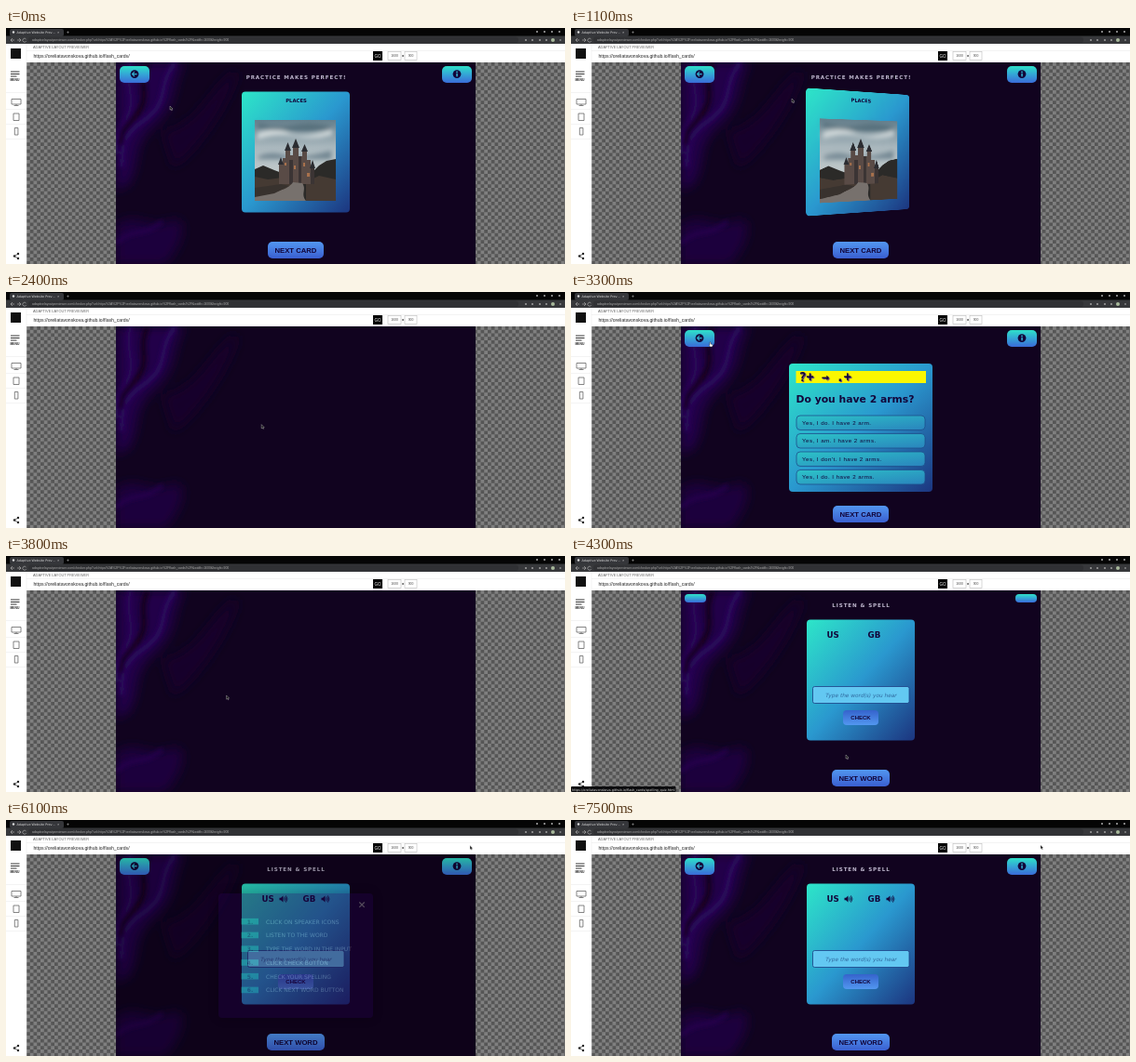
These frames come from a looping animation (600x254 px, 7.9 s). An HTML page:

```html
<!DOCTYPE html>
<html lang="en">
<head>
<meta charset="utf-8">
<title>Flash cards</title>
<style>
html, body { margin: 0; width: 100%; height: 100%; overflow: hidden; background: #fff; }
svg, #view, #app { position: absolute; left: 0; top: 0; width: 600px; height: 254px; }
#view { clip-path: inset(37px 96px 0 118px); background: #06010f; }
.face { transform-origin: 311px 133.5px; }
#checker {
  position: absolute; left: 22px; top: 37px; width: 578px; height: 217px;
  background: repeating-conic-gradient(#565656 0 25%, #7f7f7f 0 50%) 0 0 / 7.5px 7.5px;
}
text { white-space: pre; }
.sans { font-family: "Liberation Sans", Arial, sans-serif; }
.wide { font-family: "DejaVu Sans", Verdana, sans-serif; }
.mono { font-family: "DejaVu Sans Mono", monospace; }
.bold { font-weight: bold; }
.mid { text-anchor: middle; }
.shadow { text-shadow: 1px 1px 1px #4a2a90; }
</style>
</head>
<body>
<script>
const LOOP = 7900, STEP = 100;
const INK = '#12053a';
const SITE = 'https://oreliatavonskova.github.io/flash_cards/';

const rect = (x, y, w, h, fill, r = 0, extra = '') =>
  `<rect x="${x}" y="${y}" width="${w}" height="${h}" rx="${r}" fill="${fill}" ${extra}/>`;
const path = (d, fill, extra = '') => `<path d="${d}" fill="${fill}" ${extra}/>`;
const line = (d, color, width = 1, extra = '') =>
  path(d, 'none', `stroke="${color}" stroke-width="${width}" ${extra}`);
const circle = (x, y, r, fill) => `<circle cx="${x}" cy="${y}" r="${r}" fill="${fill}"/>`;
const text = (x, y, size, str, cls = 'sans', fill = INK, spacing = 0, extra = '') =>
  `<text x="${x}" y="${y}" font-size="${size}" class="${cls}" fill="${fill}" letter-spacing="${spacing}" ${extra}>${str}</text>`;
const layer = (id, body, cls = '') => `<svg id="${id}" class="${cls}" viewBox="0 0 600 254">${body}</svg>`;
const gradient = (id, x2, stops) =>
  `<linearGradient id="${id}" x1="0" y1="0" x2="${x2}" y2="1">` +
  stops.map((c, i) => `<stop offset="${i / (stops.length - 1)}" stop-color="${c}"/>`).join('') +
  '</linearGradient>';

const defs = '<defs>' +
  gradient('card', 1, ['#2de6c8', '#2a98cf', '#1c357f']) +
  gradient('nav', 0, ['#2ee0c8', '#34a5d6', '#3a6bd8']) +
  gradient('button', 0, ['#5297f0', '#3a5fd0']) +
  gradient('check', 0, ['#3563cc', '#5297f0']) +
  gradient('answer', 1, ['#2cc4c8', '#2a84bd']) +
  gradient('sky', 0, ['#66808d', '#a9b7bd', '#c3cbcc', '#8797a0']) +
  '<filter id="soft" x="-50%" y="-50%" width="200%" height="200%"><feGaussianBlur stdDeviation="6"/></filter>' +
  '<filter id="wisp" x="-50%" y="-50%" width="200%" height="200%"><feGaussianBlur stdDeviation="2.6"/></filter></defs>';

function browser() {
  const controls = [570, 578, 586, 594].map(x => circle(x, 4, 1, '#aaa')).join('');
  const tools = [558, 565, 573, 580].map(x => circle(x, 13, 1.1, '#999')).join('');
  return rect(0, 0, 600, 9, '#050505') + rect(4, 1, 58, 8, '#35363a', 2) +
    circle(8, 4.5, 1.2, '#ddd') +
    text(11.5, 5.8, 3.4, 'Adaptive Website Prev…', 'wide', '#ddd') + text(55, 5.8, 4, '×', 'sans', '#ccc') +
    text(65, 6, 5, '+', 'sans', '#ccc') + controls +
    rect(0, 8.5, 600, 8.5, '#37383b') + rect(24, 9.5, 526, 6.5, '#303134', 3) +
    line('M7 11l-2 2 2 2M5 13h4M12 13h4m-2-2l2 2-2 2M21.5 12a2 2 0 1 0 .2 2', '#bbb', .6) +
    text(28, 14.2, 3.45, 'adaptivelayoutpreviewer.com/checker.php?url=https%3A%2F%2Foreliatavonskova.github.io%2Fflash_cards%2F&amp;width=1600&amp;height=900', 'sans', '#aaa') +
    tools + circle(587, 13, 2, '#a7b89a') + circle(595, 13, .8, '#bbb');
}

function sitePanel() {
  return rect(0, 17, 600, 20, '#fff') + rect(0, 17, 22, 237, '#fff') +
    line('M22 17V254M22 24.5H600M0 69.5H22M0 87.5H22M0 103.5H22M0 119.5H22', '#e6e6e6', .5) +
    rect(5, 22, 11, 11, '#111') +
    text(29, 21.6, 3.9, 'ADAPTIVE LAYOUT PREVIEWER', 'sans', '#666') +
    text(29.5, 32, 5.1, SITE, 'sans', '#222') +
    rect(394, 25, 10, 10, '#000') + text(399, 31.6, 4.5, 'GO', 'sans mid', '#fff') +
    rect(410, 25.5, 14, 9, '#fff', 0, 'stroke="#bbb" stroke-width=".6"') +
    rect(428, 25.5, 13, 9, '#fff', 0, 'stroke="#bbb" stroke-width=".6"') +
    text(417, 31.4, 3.4, '1600', 'sans mid', '#444') + text(434.5, 31.4, 3.4, '900', 'sans mid', '#444') +
    text(426, 31.2, 4, 'x', 'sans bold mid', '#222') +
    line('M5 47H14.5M5 49.5H14.5M5 52H11.5', '#222', .9) +
    text(9.5, 57.2, 3.4, 'MENU', 'sans bold mid', '#222') +
    line('M6 76.5h10v5.5h-10zM8.5 83.5h5M11 82v1.5M8 92h6v7.5h-6zM9.3 107.5h3.6v7.5h-3.6z', '#666', .8) +
    line('M13 243l-4 2.5 4 2.5', '#222', .7) +
    [[13, 243], [9, 245.5], [13, 248]].map(([x, y]) => circle(x, y, 1.2, '#222')).join('');
}

const backdrop = rect(118, 37, 386, 217, '#11031f') +
  `<g filter="url(#soft)">` +
  path('M118 37H192C176 62 186 82 160 104S146 142 132 168L118 175z', '#21054a') +
  path('M118 212C140 196 152 218 176 208S188 240 170 254H118z', '#1b043c') +
  path('M168 112C205 104 215 72 240 50S224 120 180 150z', '#16042c') + '</g>' +
  `<g filter="url(#wisp)">` +
  line('M182 37C162 60 176 80 150 98S126 124 124 150', '#2b085e', 5) +
  line('M134 37C126 62 142 76 128 100S118 124 118 136', '#2a075a', 5) +
  line('M152 37C140 62 158 74 138 96S128 112 122 126', '#13031f', 6) +
  line('M118 232C136 214 148 226 168 208', '#25064f', 4) + '</g>';

const navShape = w => rect(122, 41, w, w > 30 ? 18 : 9, 'url(#nav)', w > 30 ? 5 : 4) +
  rect(500 - w, 41, w, w > 30 ? 18 : 9, 'url(#nav)', w > 30 ? 5 : 4);
const navFull = navShape(32) + circle(138, 49.6, 4.4, INK) + circle(484, 49.6, 4.4, INK) +
  line('M140.6 49.6h-5m2.3-2.4l-2.4 2.4 2.4 2.4', '#32b5d2', 1.1) +
  rect(483.3, 48.8, 1.5, 3.5, '#32b5d2') + circle(484, 47.3, .9, '#32b5d2');

const heading = str => text(311.5, 55.2, 5.6, str, 'wide bold mid', '#bdb6cc', .9);
const card = rect(253, 68.5, 116, 130, 'url(#card)', 4);
const nextButton = (str, x, w) => rect(x, 230, w, 18, 'url(#button)', 5) +
  text(x + w / 2, 241.8, 7.7, str, 'sans bold mid');
const speaker = (x, y, s = 1) => `<g transform="translate(${x} ${y}) scale(${s})">` +
  path('M0-1.3h1.6L4-3.4v6.8L1.6 1.3H0z', INK) +
  line('M5-1.4q1.2 1.4 0 2.8M6-2.5q2.2 2.5 0 5M7-3.6q3 3.6 0 7.2', INK, .8) + '</g>';

const photo = rect(267, 99, 87, 87, 'url(#sky)') +
  `<g filter="url(#wisp)">` +
  path('M270 113q20-7 34 0t46-4v6q-20 6-40 2t-40 3z', '#d3dadb') +
  path('M270 102q20 6 40 2t40 2v3q-30 4-80-1z', '#566f7c') +
  path('M271 138q14-6 28-1t50-5v9h-78z', '#718591') + '</g>' +
  path('M267 152l9-4 12 5 8 3h32l8-8 8-5 10-2v45h-87z', '#2b2a28') +
  path('M267 160l14 3 16-2 12 6-12 8-30 5zM322 166l14-7 18 4v23h-32z', '#453a33') +
  path('M293 168V146h4v-6h3v-9h5v6h3v-9h6v10h4v-6h5v10h4v8h4v18z', '#594b46') +
  path('M304 168V142h4v26zM314 168V138h3v30zM327 168V150h4v18z', '#3b3434') +
  path('M292 147l3-8 3 8zM299 132l3.500-9 3.500 9zM307 129l4-10 4 10zM317 133l3.500-8 3.500 8zM326 151l3-9 3 9z', '#2b2c31') +
  path('M299 145h2v3h-2zM309 148h2v4h-2zM319 145h2v4h-2zM323 156h3v4h-3z', '#a8714c') +
  path('M308 166l10 1c5 7-2 11 4 19h-55v-6c20-2 36-6 41-14z', '#77716d') +
  path('M267 172l28-4 9 2-16 8-21 4z', '#38322e');

const front = card + text(311.5, 80, 5.3, 'PLACES', 'wide bold mid') + photo;
const back = card + text(312.5, 114, 10.2, 'castle', 'wide bold mid shadow', INK, 2) +
  text(311.6, 142.6, 7, '[ˈkæs.əl]', 'wide mid', INK, 1.2) +
  text(278, 170.3, 6, 'US', 'wide bold', INK, .5) + text(318.5, 170.3, 6, 'GB', 'wide bold', INK, .5) +
  speaker(293.5, 168, .9) + speaker(334.5, 168, .9);

const answers = ['Yes, I do. I have 2 arm.', 'Yes, I am. I have 2 arms.', "Yes, I don't. I have 2 arms.", 'Yes, I do. I have 2 arms.'];
const quiz = rect(234, 77, 154, 138, 'url(#card)', 4) + rect(241.5, 85, 139.5, 13, '#fbf700') +
  text(244.5, 96, 13.4, '?+ → .+', 'mono bold shadow') +
  text(241.5, 119, 10.8, 'Do you have 2 arms?', 'wide bold') +
  answers.map((str, i) => {
    const y = 133 + i * 19.5;
    return rect(242, y, 138, 15.5, 'url(#answer)', 4, 'stroke="#1d4f8c" stroke-width=".8"') +
      text(248, y + 9.9, 6.2, str, 'sans', INK, .46);
  }).join('') + nextButton('NEXT CARD', 281, 60);

const spell = heading('LISTEN &amp; SPELL') + card +
  text(274.5, 88, 8.7, 'US', 'wide bold') + text(318.5, 88, 8.7, 'GB', 'wide bold') +
  rect(259.5, 140.5, 103.5, 18, '#63c8f2', 2, 'stroke="#1c3f86" stroke-width=".8"') +
  text(311.5, 152.4, 5.8, 'Type the word(s) you hear', 'wide mid', '#2f699f', 0, 'font-style="italic"') +
  rect(292, 166, 38, 16, 'url(#check)', 4) + text(311, 176.3, 6, 'CHECK', 'sans bold mid') +
  nextButton('NEXT WORD', 280, 62);

const steps = ['CLICK ON SPEAKER ICONS', 'LISTEN TO THE WORD', 'TYPE THE WORD IN THE INPUT', 'CLICK CHECK BUTTON', 'CHECK YOUR SPELLING', 'CLICK NEXT WORD BUTTON'];
const modal = rect(228, 79, 166, 134, '#000', 4, 'filter="url(#soft)" opacity=".7"') +
  rect(228, 79, 166, 134, '#250050', 4) + line('M379.3 88.5l5.4 5.4m0-5.4l-5.4 5.4', '#ddd', 1.2) +
  steps.map((str, i) => {
    const y = 109.2 + i * 14.75;
    return rect(252, y - 3.3, 19, 6.6, '#218f98') + text(262, y + 2.3, 6, `${i + 1}.`, 'wide bold mid') +
      text(279, y + 2.3, 6, str, 'wide', '#b5a9cc');
  }).join('');

const overlay = '<g id="status">' + rect(0, 248, 0, 6, '#0c0c0e', 1, 'id="statusBox"') +
  text(1, 252.6, 3.45, '', 'wide', '#ddd', 0, 'id="statusText"') + '</g>' +
  '<g id="pointer">' + path('M0 0V4.200L1 3.400 1.700 4.800 2.400 4.500 1.800 3.100H3z', '#111', 'id="arrow" stroke="#ccc" stroke-width=".4"') +
  path('M0 0h1v2l2 .5v1.600L2.300 5H.4L-1 3l1-.2z', '#fff', 'id="hand" stroke="#222" stroke-width=".4"') + '</g>';

document.body.innerHTML = '<div id="checker"></div>' +
  layer('frame', defs + browser() + sitePanel()) +
  '<div id="view"><div id="app">' + layer('backdrop', backdrop) +
  layer('navBare', navShape(23)) + layer('navFull', navFull) +
  layer('cards', heading('PRACTICE MAKES PERFECT!') + nextButton('NEXT CARD', 281, 60)) +
  layer('front', front, 'face') + layer('back', back, 'face') +
  layer('quiz', quiz) + layer('spell', spell) +
  layer('sound', speaker(293.5, 85) + speaker(338.5, 85)) +
  '</div>' + layer('modal', modal) + '</div>' + layer('overlay', overlay);

const el = id => document.getElementById(id);
const show = (id, on) => { el(id).style.display = on ? '' : 'none'; };
const clamp = v => Math.min(1, Math.max(0, v));
const within = (t, a, b) => t >= a && t < b;

// time, x, y
const route = [
  [0, 176, 84], [200, 152, 59], [700, 285, 120], [800, 290, 122], [900, 290, 122],
  [1100, 237, 76], [1500, 152, 55], [1900, 151, 53], [2000, 151, 53], [2500, 305, 165],
  [2700, 305, 165], [3200, 151, 55], [3300, 149, 54], [3500, 149, 54], [4000, 295, 214],
  [4400, 295, 214], [4800, 537, 60], [5000, 486, 49], [5400, 483, 50], [5500, 479, 53],
  [5900, 479, 53], [6300, 517, 2], [6400, 504, 6], [6900, 504, 6], [7500, 504, 27], [LOOP, 504, 27]
];
function pointerAt(t) {
  const i = route.findIndex(p => p[0] > t);
  const [a, b] = [route[i - 1], route[i]];
  const u = (t - a[0]) / (b[0] - a[0]);
  return [a[1] + (b[1] - a[1]) * u, a[2] + (b[2] - a[2]) * u];
}

function statusAt(t) {
  if (within(t, 1600, 2000) || within(t, 3500, 3600)) return 'index.html';
  return within(t, 4000, 4400) ? 'spelling_quiz.html' : '';
}

function draw(t) {
  const onCards = t < 2000, onQuiz = within(t, 2600, 3600), onSpell = t >= 4300;
  const loading = within(t, 2600, 2700) || within(t, 4300, 4400);
  show('cards', onCards);
  show('quiz', onQuiz);
  show('spell', onSpell);
  show('sound', onSpell && !loading);
  show('navBare', loading);
  show('navFull', (onCards || onQuiz || onSpell) && !loading);

  const angle = 90 * (1 - Math.cos(Math.PI * clamp((t - 1000) / 500)));
  show('front', onCards && angle < 90);
  show('back', onCards && angle >= 90);
  el('front').style.transform = angle ? `perspective(290px) rotateY(${angle}deg)` : '';
  el('back').style.transform = angle < 180 ? `perspective(290px) rotateY(${angle - 180}deg)` : '';

  const open = clamp((t - 5000) / 300) - clamp((t - 5900) / 300);
  show('modal', open > 0);
  el('modal').style.opacity = open;
  el('app').style.filter = open > 0 ? `blur(${1.5 * open}px) brightness(${1 - .55 * open})` : '';

  const status = statusAt(t);
  show('status', status);
  if (status) {
    el('statusText').textContent = SITE + status;
    el('statusBox').setAttribute('width', el('statusText').getComputedTextLength() + 2);
  }

  const hand = within(t, 1500, 2000) || within(t, 3200, 3600) || within(t, 5000, 5100);
  show('hand', hand);
  show('arrow', !hand);
  el('pointer').setAttribute('transform', `translate(${pointerAt(t)})`);
}

function tick() {
  draw(Math.floor(performance.now() % LOOP / STEP) * STEP);
  requestAnimationFrame(tick);
}
tick();
</script>
</body>
</html>
```
